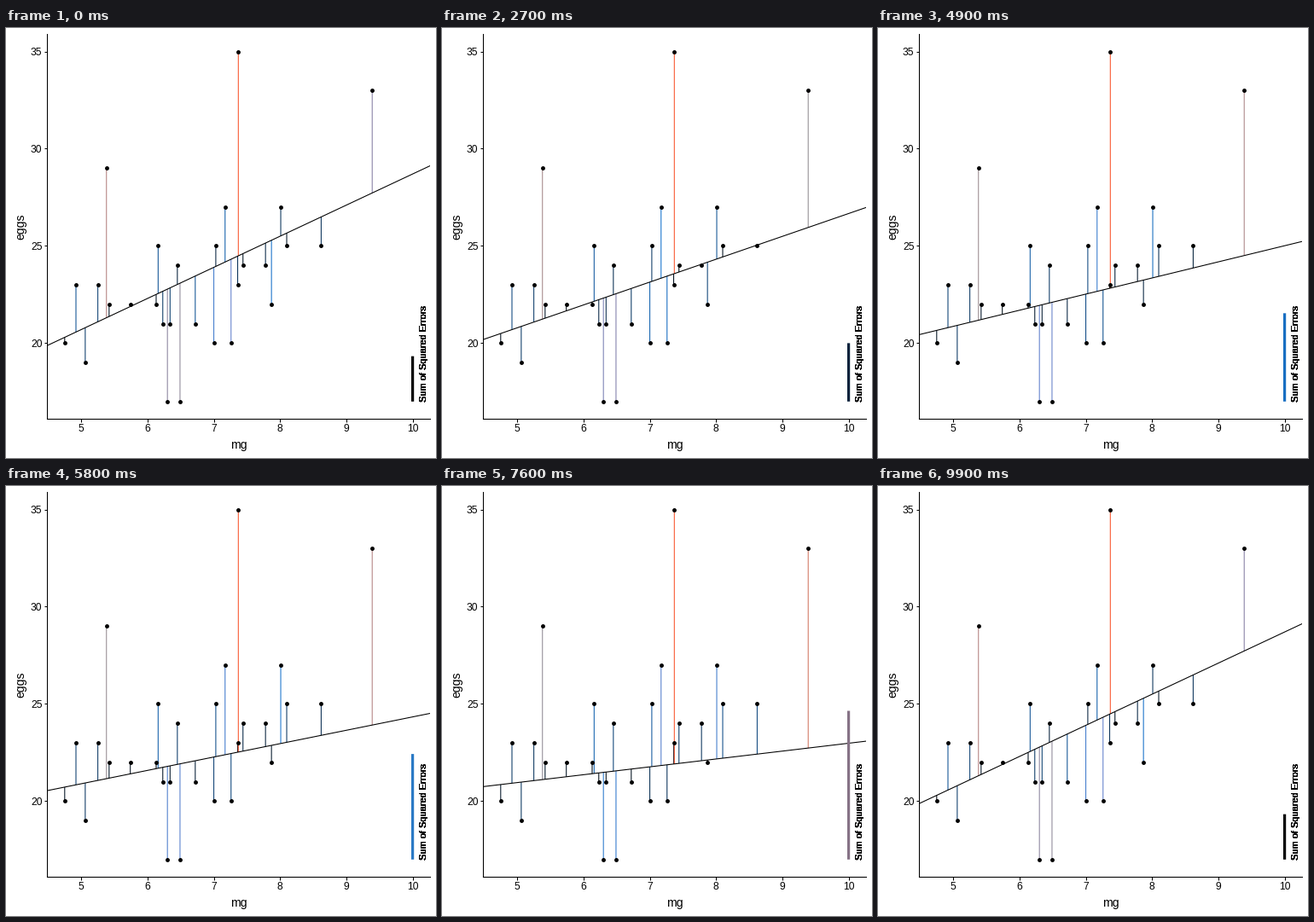
Animation, 504 px wide and 504 px high, one loop 10 s. Source, as a matplotlib script:

```python
import numpy as np
import matplotlib.pyplot as plt
from matplotlib.animation import FuncAnimation
from matplotlib.collections import LineCollection

SIZE, DPI = 504, 72
FRAMES, INTERVAL = 100, 100
FALL_END, RETURN_START = 89, 90      # last falling frame, start of the way back
LINE_WIDTH = 1.07
BAR_X, BAR_BASE = 10, 17
START_FIT = np.array([12.7, 1.6])    # intercept, slope
END_FIT = np.array([20.0, 0.2])

mg = np.array([4.75, 4.92, 5.06, 5.25, 5.38, 5.42, 5.74, 6.13, 6.16, 6.23,
               6.30, 6.34, 6.45, 6.49, 6.72, 7.00, 7.03, 7.17, 7.26, 7.36,
               7.37, 7.44, 7.78, 7.87, 8.01, 8.10, 8.62, 9.39])
eggs = np.array([20, 23, 19, 23, 29, 22, 22, 22, 25, 21, 17, 21, 24, 17,
                 21, 20, 25, 27, 20, 23, 35, 24, 24, 22, 27, 25, 25, 33])

ERROR_STOPS = [0, 0.32, 0.41, 0.5, 0.62, 0.73, 0.81, 1]
ERROR_COLORS = ["#000000", "#1874cd", "#6482cd", "#877fa5",
                "#948e94", "#b48282", "#e07055", "#fa552d"]
BAR_STOPS = [0, 0.32, 0.55, 0.91, 1]
BAR_COLORS = ["#000000", "#1874cd", "#4080bc", "#cd6450", "#ee5a32"]

plt.rcParams["font.family"] = "Liberation Sans"


def gradient(values, stops, colors):
    rgb = plt.matplotlib.colors.to_rgba_array(colors)[:, :3]
    return np.stack([np.interp(values, stops, c) for c in rgb.T], axis=-1)


def mix(a, b, t):
    return a + (b - a) * t


def falling_state(t):
    """Fit, error colours, bar height and bar colour while the slope falls."""
    fit = mix(START_FIT, END_FIT, t)
    errors = np.abs(eggs - fit[0] - fit[1] * mg)
    return (fit,
            gradient(errors / errors.max(), ERROR_STOPS, ERROR_COLORS),
            2.33 + 7.29 * t ** 2,
            gradient(t ** 2, BAR_STOPS, BAR_COLORS))


def state_at(frame):
    if frame <= RETURN_START:
        return falling_state(min(frame / FALL_END, 1))
    t = (frame - RETURN_START) / (FRAMES - 1 - RETURN_START)
    return [mix(a, b, t) for a, b in zip(falling_state(1), falling_state(0))]


fig = plt.figure(figsize=(SIZE / DPI, SIZE / DPI), dpi=DPI, facecolor="white")
left, right, top, bottom = 48.4, 497, 7, 458.3
ax = fig.add_axes([left / SIZE, 1 - bottom / SIZE,
                   (right - left) / SIZE, (bottom - top) / SIZE])
ax.set(xlim=(4.4875, 10.2625), ylim=(16.1, 35.9),
       xticks=range(5, 11), yticks=range(20, 36, 5))
ax.spines[["top", "right"]].set_visible(False)
ax.spines[["left", "bottom"]].set_linewidth(LINE_WIDTH)
ax.tick_params(length=3.5, width=LINE_WIDTH, labelsize=12, pad=2.5)


def label(x, y, text, size, rotation=0):
    """Text centred on a baseline point given in pixels from the top left."""
    fig.text(x / SIZE, 1 - y / SIZE, text, fontsize=size, rotation=rotation,
             ha="center", va="baseline", rotation_mode="anchor")


label(272.7, 493, "mg", 14)
label(21, 232.6, "eggs", 14, 90)
for _ in range(14):      # repeated printing makes the letters heavy
    label(493, 382, "Sum of Squared Errors", 11.04, 90)

segments = LineCollection([], linewidths=LINE_WIDTH, capstyle="butt", zorder=2)
segments.set_snap(False)
ax.add_collection(segments, autolim=False)
fit_line, = ax.plot([], [], color="black", lw=LINE_WIDTH, zorder=3)
bar, = ax.plot([], [], lw=3.2, solid_capstyle="butt", snap=False, zorder=3)
ax.plot(mg, eggs, "o", color="black", ms=4.9, mew=0, snap=False, zorder=4)


def update(frame):
    (intercept, slope), colors, height, bar_color = state_at(frame)
    fitted = intercept + slope * mg
    segments.set_segments([[(x, y), (x, f)] for x, y, f in zip(mg, eggs, fitted)])
    segments.set_color(colors)
    ends = np.array([4, 11])
    fit_line.set_data(ends, intercept + slope * ends)
    bar.set_data([BAR_X, BAR_X], [BAR_BASE, BAR_BASE + height])
    bar.set_color(tuple(bar_color))
    return segments, fit_line, bar


animation = FuncAnimation(fig, update, frames=FRAMES, interval=INTERVAL,
                          repeat=True, repeat_delay=0)
plt.show()
```
